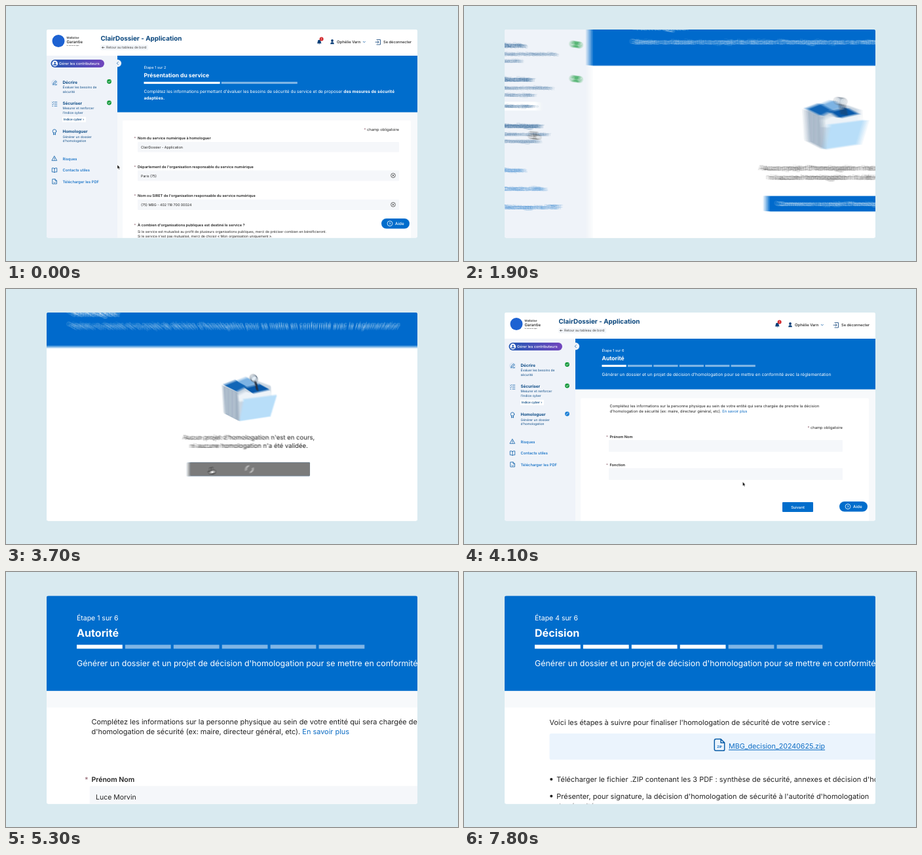
Recreate the animation shown at these times as an HTML page. Size 690 by 390 pixels, loop 8000 ms.

```html
<!DOCTYPE html>
<html lang="fr">
<head>
<meta charset="utf-8">
<title>Homologation</title>
<style>
html, body { margin: 0; width: 100%; height: 100%; overflow: hidden; background: #d9eaf0; }
svg { display: block; width: 690px; height: 390px; }
text { font-family: Inter, "Noto Sans", sans-serif; fill: #222; text-rendering: geometricPrecision; }
.b { font-weight: 700; }
.sb { font-weight: 600; }
.m { font-weight: 500; }
.w { fill: #fff; }
.navy { fill: #0b4a85; }
.link { fill: #0a6bc4; }
.line { fill: none; stroke: #0b5ea8; stroke-width: .8; stroke-linecap: round; stroke-linejoin: round; }
</style>
</head>
<body>
<svg viewBox="0 0 690 390">
  <defs>
    <clipPath id="frame"><rect x="62" y="36" width="566" height="318.5" rx="3"/></clipPath>
    <linearGradient id="pill"><stop offset="0" stop-color="#2459b4"/><stop offset="1" stop-color="#7145bd"/></linearGradient>
    <g id="world"></g>
  </defs>
  <g id="layers" clip-path="url(#frame)"></g>
</svg>
<script>
const BLUE = '#006dcc', FIELD = '#f5f7fa';
const LOOP = 8000, MOVE = 400, SHUTTER = 10, LAYERS = 8;
const $ = id => document.getElementById(id);

// Drawing helpers; text is placed by the middle of its line.
const text = (x, y, size, str, cls = '', more = '') =>
  `<text x="${x}" y="${(y + size * .36).toFixed(2)}" font-size="${size}" class="${cls}" ${more}>${str}</text>`;
const rect = (x, y, w, h, fill, r = 0) =>
  `<rect x="${x}" y="${y}" width="${w}" height="${h}" rx="${r}" fill="${fill}"/>`;
const dot = (x, y, r, fill, more = '') => `<circle cx="${x}" cy="${y}" r="${r}" fill="${fill}" ${more}/>`;
const line = (d, more = '') => `<path class="line" d="${d}" ${more}/>`;
const shape = (d, fill) => `<path d="${d}" fill="${fill}"/>`;
const group = (id, body) => `<g id="${id}">${body}</g>`;
const END = 'text-anchor="end"', MID = 'text-anchor="middle"';

const required = (x, y) => text(x, y, 5.8, '<tspan fill="#8a5a68">*</tspan> champ obligatoire', '', END);
const label = (x, y, str) => text(x - 5.5, y, 5.6, '*', '', 'style="fill:#8a5a68"') + text(x, y, 5.6, str, 'sb');
const clear = y => dot(591, y, 3.4, 'none', 'stroke="#333" stroke-width=".7"') +
  line(`M589.8 ${y - 1.2}l2.4 2.4m0 -2.4l-2.4 2.4`, 'style="stroke:#333"');
const check = y => dot(157.5, y, 3.4, '#159a3c') + line(`M156 ${y}l1.1 1.2 2 -2.3`, 'style="stroke:#fff"');

const header = rect(59.5, 36, 568.5, 41, '#fff') +
  dot(80, 53.5, 9.5, '#1d62d2') +
  text(92.5, 48.5, 4.4, 'MaBalise', 'm') + text(92.5, 55, 6.1, 'Garantie', 'm') +
  text(92.5, 60, 2.1, 'Un service en ligne') +
  text(144.5, 49, 9.9, 'ClairDossier - Application', 'b', 'style="fill:#08457c"') +
  rect(144.5, 59.5, 72.5, 8, '#f2f5f9', 1) +
  line('M150 63.5h-3.4m1.4 -1.4l-1.4 1.4 1.4 1.4', 'style="stroke:#555"') +
  text(153, 63.5, 5, 'Retour au tableau de bord', '', 'style="fill:#444"') +
  shape('M474.8 57.2q1 -1 1 -3a2.4 2.4 0 0 1 4.8 0q0 2 1 3zM477 57.8h2.4q-1.2 1.6 -2.4 0z', '#0b3f78') +
  dot(481.6, 50.6, 3, '#d32a2f') + text(481.6, 50.6, 3.8, '1', 'w sb', MID) +
  dot(498, 53, 1.9, '#0b3f78') + shape('M495.2 58.3q0 -3 2.8 -3t2.8 3z', '#0b3f78') +
  text(505, 55, 5.9, 'Ophélie Varn', 'm') + line('M545.3 54.3l1.5 1.5 1.5 -1.5') +
  line('M566 51.5h5.5v7.5h-5.5M564 55.2h5m-1.7 -1.7l1.7 1.7 -1.7 1.7', 'style="stroke:#0b3f78"') +
  text(576, 55, 5.7, 'Se déconnecter', 'm');

const menu = (y, title, lines) => text(86.5, y, 6.3, title, 'b navy') +
  lines.map((s, i) => text(86.5, y + 8 + i * 6.6, 4.9, s, 'navy')).join('');
const sidebar = rect(59.5, 76, 111, 280, '#eff3f9') +
  rect(68.5, 82, 81.5, 12, 'url(#pill)', 6) +
  dot(74.7, 88, 4.4, '#fff') + dot(74.7, 86.8, 1.4, '#2459b4') + shape('M72.1 90.7q0 -2.3 2.6 -2.3t2.6 2.3z', '#2459b4') +
  text(81, 88, 5.6, 'Gérer les contributeurs', 'w m') +
  dot(74, 117.6, 5, '#dbe6f3') + line('M71.8 120l.5 -2 3.4 -3.6 1.5 1.5 -3.4 3.6zM75 120.4h2.4') +
  menu(116.3, 'Décrire', ['Évaluer les besoins de', 'sécurité']) + check(115.5) +
  line('M74 147h3.8M74 150h3.8M74 153h3.8M70.5 147l.8 .8 1.2 -1.4M70.5 150l.8 .8 1.2 -1.4M70.7 153h1') +
  menu(148.3, 'Sécuriser', ['Mesurer et renforcer', "l'indice cyber"]) + check(148) +
  rect(86, 169.5, 36, 8.2, '#fff', 1) + text(88, 173.5, 4.7, 'Indice cyber ›', 'sb navy') +
  dot(74, 191.5, 2.8, 'none', 'class="line"') + line('M72.5 194v3l1.5 -.9 1.5 .9v-3') +
  menu(192, 'Homologuer', ['Générer un dossier', "d'homologation"]) +
  line('M74 229.7l3.7 6.6h-7.4zM74 232v2M74 235.2v.1') +
  line('M74 248.5q-2 -1.2 -3.7 -.6v6q1.7 -.6 3.7 .6 2 -1.2 3.7 -.6v-6q-1.7 -.6 -3.7 .6zv6') +
  line('M71.2 264.8h3.8l2.4 2.4v4.8h-6.2zM75 264.8v2.4h2.4M73 269.5l1.3 1.3 1.3 -1.3') +
  ['Risques', 'Contacts utiles', 'Télécharger les PDF'].map((s, i) => text(86.5, 233.7 + 17.5 * i, 5.8, s, 'link m')).join('') +
  group('progressMark', dot(157.5, 191, 3.4, '#1b7fd6') + line('M156 192.3l2.8 -2.8', 'style="stroke:#fff"'));

const banner = bottom => rect(170, 76, 460, bottom - 76, BLUE);
const toggle = dot(170.5, 87.6, 5.6, '#eff3f9') + line('M171.3 85.6l-2 2 2 2');
const steps = (n, total, title) => {
  const pitch = 236.5 / total;
  let out = text(210.5, 94, 5.6, `Étape ${n} sur ${total}`, 'w') + text(210.5, 106, 8.6, title, 'b w');
  for (let i = 0; i < total; i++)
    out += rect(210.5 + i * pitch, 115.9, pitch - 2.2, 3.2, i < n ? '#fff' : '#7fb5e5');
  return out;
};
const sheet = top => rect(170, 76, 460, 280, '#f7f9fb') + rect(178, top, 440, 190, '#fff', 2);
const help = rect(573, 325, 43, 15.5, BLUE, 7.7) +
  dot(586, 332.7, 3.9, 'none', 'stroke="#fff" stroke-width=".8"') + text(586, 332.7, 5, '?', 'w sb', MID) +
  text(594, 332.8, 6.3, 'Aide', 'w m');

const form = sheet(175) + banner(162.5) + steps(1, 2, 'Présentation du service') +
  text(210.5, 131, 6.5, `Complétez les informations permettant d'évaluer les besoins de sécurité du service et de proposer <tspan class="b">des mesures de sécurité</tspan>`, 'w') +
  text(210.5, 140.5, 6.5, 'adaptées.', 'b w') + required(600, 188.5) +
  label(201, 202, 'Nom du service numérique à homologuer') + rect(201, 208, 399, 15.5, FIELD, 1) +
  text(206, 216, 5.3, 'ClairDossier - Application') +
  label(201, 245.7, "Département de l'organisation responsable du service numérique") + rect(201, 251.5, 399, 16, FIELD, 1) +
  text(206, 259.8, 5.3, 'Paris (75)') + clear(259.2) +
  label(201, 290.2, "Nom ou SIRET de l'organisation responsable du service numérique") + rect(201, 296, 399, 16, FIELD, 1) +
  text(206, 304.2, 5.3, '(75) MBG - 402 118 700 00024') + clear(303.7) +
  label(201, 334.7, "À combien d'organisations publiques est destiné le service ?") +
  text(201, 345.5, 5.2, 'Si le service est mutualisé au profit de plusieurs organisations publiques, merci de préciser combien en bénéficieront.') +
  text(201, 352.6, 5.2, "Si le service n'est pas mutualisé, merci de choisir « Mon organisation uniquement ».");

const intro = y => text(210.5, y, 6.6, "Générer un dossier et un projet de décision d'homologation pour se mettre en conformité avec la réglementation", 'w');
const folder =
  shape('M373 177l26 -9 25 9 1 28 -34.5 9 -16 -9z', '#c9d6e2') +
  shape('M373 177l16 7 1.5 30.500 -15.500 -8z', '#a3b4c5') +
  line('M377 180v26M381 181.500v27M385 183.500v27', 'style="stroke:#c3cfdb;stroke-width:1.200"') +
  shape('M374 176l13 -5 13 6 -12 6z', '#1668b8') +
  shape('M388 172l10 -4 12 6 -11 4z', '#7fb4e3') +
  shape('M396 179l16 -4 11 6 -18 4z', '#0a5cab') +
  shape('M389 187l8 -4 8 2 18 -4 2 6 -35 7z', '#eef3f8') +
  line('M407.500 172l2 9', 'style="stroke:#2c3340;stroke-width:2.200"') +
  dot(406, 169, 3.4, '#e3edf5', 'stroke="#6e7d8c" stroke-width="1.200"') +
  shape('M395 191l35.500 -4.500 -7 23 -33 5z', '#b9defa');
const MIDDLE = 401;
const empty = rect(170, 76, 460, 280, '#fff') + banner(135.5) + text(210.5, 98.8, 8.5, 'Homologuer', 'b w') +
  intro(113) + folder +
  text(MIDDLE, 231.8, 6.65, "Aucun projet d'homologation n'est en cours,", '', MID) +
  text(MIDDLE, 240.7, 6.65, "ni aucune homologation n'a été validée.", '', MID) +
  rect(MIDDLE - 64.5, 258.3, 129, 14.6, BLUE, 1) + text(MIDDLE, 265.6, 6, "Commencer un projet d'homologation", 'w m', MID) +
  group('busy', rect(MIDDLE - 64.5, 258.3, 129, 14.6, '#7d7d7d', 1) +
    line('M397.800 267a3.800 3.800 0 0 1 3 -5M404.800 264a3.800 3.800 0 0 1 -3 5', 'style="stroke:#bbb;stroke-width:1.700;stroke-linecap:butt"'));

const radios = list => list.map((s, i) => {
  const y = 217.9 + 13.7 * i;
  return dot(226.8, y, 3.9, '#fff', 'stroke="#222" stroke-width=".75"') + text(236.6, y, 5.83, s);
}).join('');
const para = (y, ...lines) => lines.map((s, i) => text(222.5, y + 8.1 * i, 5.83, s)).join('');
const bullet = (y, s) => dot(224, y, 1.1, '#222') + text(228.3, y, 5.83, s);

const stages = [
  ['Autorité', para(178.7, 'Complétez les informations sur la personne physique au sein de votre entité qui sera chargée de prendre la décision',
    `d'homologation de sécurité (ex: maire, directeur général, etc). <tspan class="link">En savoir plus</tspan>`) +
    required(578, 212) + label(222.5, 225.6, 'Prénom Nom') + rect(221, 231, 357, 18, FIELD, 1) +
    text(226, 240, 5.6, '', '', 'id="person"') +
    label(222.5, 269.3, 'Fonction') + rect(221, 274, 357, 18, FIELD, 1) + text(226, 283, 5.6, '', '', 'id="role"') +
    rect(486, 326, 47, 15, BLUE, 1) + text(509.5, 333.5, 5.8, 'Suivant', 'w m', MID)],
  ['Avis', para(184.5, "Ajoutez, si vous le souhaitez, un ou plusieurs avis que vous prévoyez de présenter à l'autorité d'homologation. Cette",
    "liste apparaîtra en annexe du PDF de décision d'homologation de sécurité.") +
    radios(['Aucun avis spécifique', 'Ajouter un ou plusieurs avis'])],
  ['Documents', para(184.5, "Référencez, si vous le souhaitez, un ou plusieurs documents que vous prévoyez de présenter à l'autorité. Cette",
    "liste apparaîtra en annexe du PDF de décision d'homologation de sécurité.") +
    radios(['Aucun document à référencer', 'Référencer un ou plusieurs documents'])],
  ['Décision', para(179.2, "Voici les étapes à suivre pour finaliser l'homologation de sécurité de votre service :") +
    rect(222.5, 188.3, 356, 21.3, '#ebf4fd', 1.5) +
    line('M358 192.8h4l3 3v5.500q0 1 -1 1h-6q-1.200 0 -1.200 -1.200v-7q0 -1.300 1.200 -1.300zM362 192.800v3h3') +
    text(361, 199.3, 2.6, 'ZIP', 'b link', MID) +
    text(368.4, 198.3, 5.7, 'MBG_decision_20240625.zip', 'link', 'text-decoration="underline"') +
    bullet(225.6, "Télécharger le fichier .ZIP contenant les 3 PDF : synthèse de sécurité, annexes et décision d'homologation") +
    bullet(239.3, "Présenter, pour signature, la décision d'homologation de sécurité à l'autorité d'homologation") +
    text(228.3, 247.4, 5.83, 'de sécurité.')]
];
const stage = ([title, body], i) => group('page' + (i + 2),
  sheet(167) + banner(153.5) + steps(i + 1, 6, title) + intro(131) + body);

const arrow = '<path id="arrow" d="M0 0V6L1.400 4.800 2.300 6.900 3.400 6.400 2.500 4.400H4.300Z" fill="#111" stroke="#fff" stroke-width=".4"/>';
const hand = '<path id="hand" d="M-1 -3q1 -1 1.400 .2V-.5l2.400 .6q.7 .3 .5 1.200L2.800 3.500H-.9L-2.800 .9q.2 -1 1.800 .2z" fill="#fff" stroke="#222" stroke-width=".8"/>';

$('world').innerHTML = rect(59.5, 36, 570.5, 320, '#fff') + header + sidebar +
  group('page0', form) + group('page1', empty) + stages.map(stage).join('') +
  toggle + help + group('cursor', arrow + hand);

const layers = Array.from({ length: LAYERS }, (_, i) => {
  const use = document.createElementNS('http://www.w3.org/2000/svg', 'use');
  use.setAttribute('href', '#world');
  use.setAttribute('opacity', 1 / (i + 1));
  return $('layers').appendChild(use);
});

// Tracks: [start, duration, ...values]
const camera = [
  [0, 1, 1, 0, 0],
  [760, MOVE, 1.6, -27, -118],
  [1758, MOVE, 1.725, -340, -176],
  [3516, MOVE, 1, 0, 0],
  [4875, MOVE, 1.875, -286.7, -106]
];
const pointer = [
  [0, 1, 170, 243],
  [80, 520, 118, 201],
  [1930, 320, 340.5, 263.5],
  [3500, 200, 361, 267],
  [3920, 380, 510, 332],
  [6690, 1, 307, 219]
];
const pageStarts = [0, 1400, 4000, 5700, 6700, 7700];

const clamp = v => Math.min(1, Math.max(0, v));
const ease = p => p < .5 ? 4 * p ** 3 : 1 - 4 * (1 - p) ** 3;
const track = (keys, t) => keys.reduce((now, [start, length, ...next]) => {
  const f = ease(clamp((t - start) / length));
  return now ? now.map((v, i) => v + (next[i] - v) * f) : next;
}, null);
const view = t => {
  const [s, x, y] = track(camera, t);
  return `translate(${x.toFixed(2)} ${y.toFixed(2)}) scale(${s.toFixed(4)})`;
};
const show = (id, on) => $(id).setAttribute('display', on ? 'inline' : 'none');
const type = (id, str, chars) => {
  const part = str.slice(0, Math.max(0, Math.floor(chars)));
  if ($(id).textContent !== part) $(id).textContent = part;
};

function draw(t) {
  const page = pageStarts.filter(s => s <= t).length - 1;
  pageStarts.forEach((_, i) => show('page' + i, i === page));
  show('progressMark', page > 1);
  $('busy').setAttribute('opacity', clamp((t - 2850) / 100));
  type('person', 'Luce Morvin', (t - 4450) / 15);
  type('role', 'Directrice générale des services', (t - 4600) / 7);

  const [x, y] = track(pointer, t);
  const pointing = t > 500 && t < 3950;
  $('cursor').setAttribute('transform', `translate(${x.toFixed(2)} ${y.toFixed(2)})`);
  show('cursor', page < 5);
  show('hand', pointing);
  show('arrow', !pointing);

  // Motion blur: average several camera positions within the shutter time.
  const moving = view(t - SHUTTER / 2) !== view(t + SHUTTER / 2);
  layers.forEach((layer, i) => {
    layer.setAttribute('display', moving || !i ? 'inline' : 'none');
    layer.setAttribute('transform', view(moving ? t + SHUTTER * (i / (LAYERS - 1) - .5) : t));
  });
}

const begin = performance.now();
function tick() {
  draw((performance.now() - begin) % LOOP);
  requestAnimationFrame(tick);
}
tick();
</script>
</body>
</html>
```
